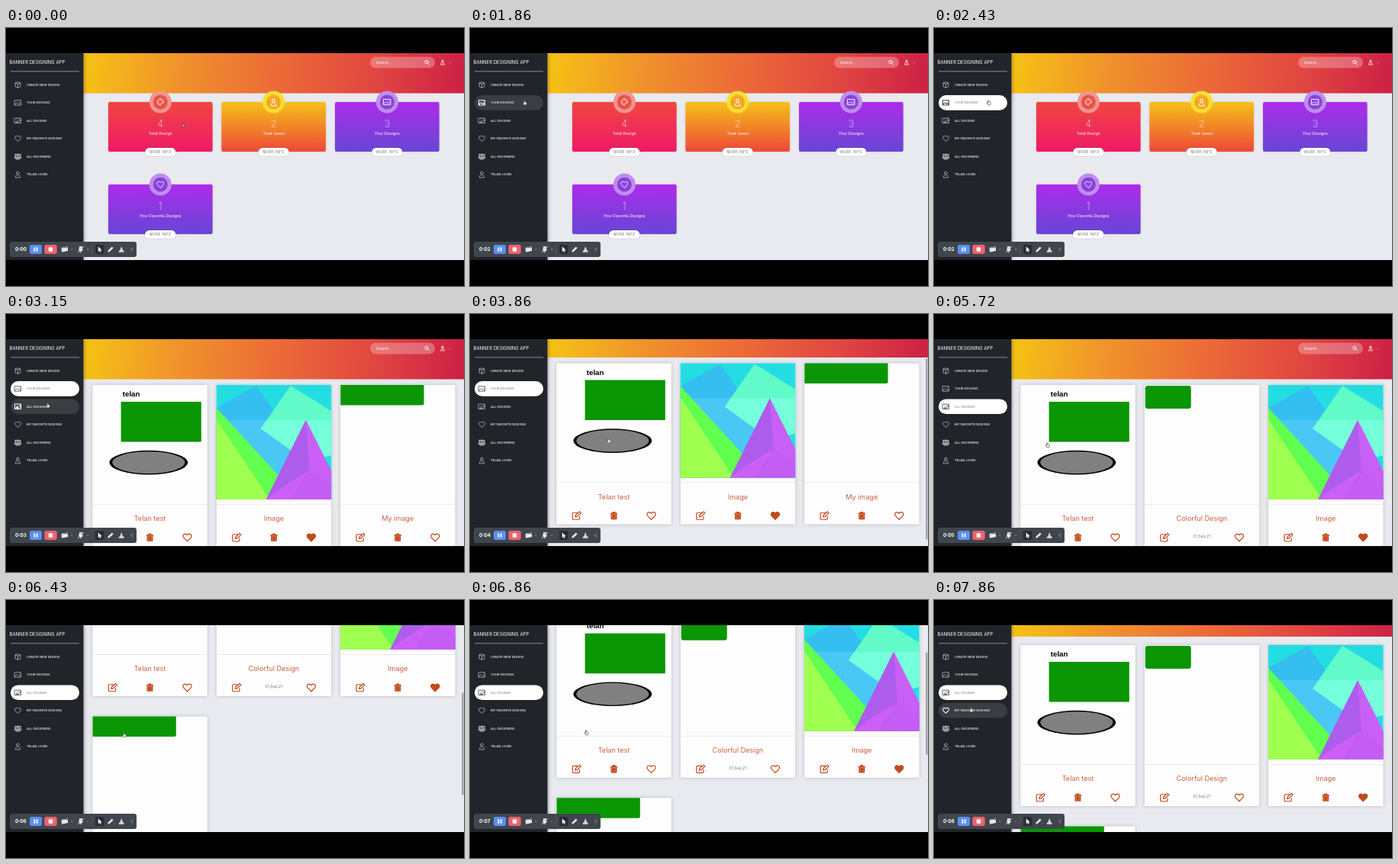
Write an HTML page with a canvas that moves like this. It is 600 px wide and 338 px high and loops after 8 s.

```html
<!DOCTYPE html>
<html lang="en">
<head>
<meta charset="utf-8">
<title>Banner Designing App</title>
<style>
html, body { margin: 0; width: 100%; height: 100%; overflow: hidden; background: #000; }
canvas { display: block; width: 600px; height: 338px; }
</style>
</head>
<body>
<canvas id="stage" width="600" height="338"></canvas>
<script>
const ctx = document.getElementById('stage').getContext('2d');
const LOOP = 8000, STEPS_PER_SEC = 7;
const TOP = 33, BOTTOM = 304, SIDE = 101.5, VIEW = BOTTOM - TOP;
const SANS = 'Inter, "Open Sans", sans-serif';
const RUST = '#c14a1c', GREEN = '#0a9605';

const MENU = [
  ['CREATE NEW DESIGN', 'box'], ['YOUR DESIGNS', 'image'], ['ALL DESIGNS', 'gallery'],
  ['MY FAVORITE DESIGNS', 'heart'], ['ALL DESIGNERS', 'group'], ['TELAN LOGIN', 'user']
];
const rowY = i => 74.5 + i * 23.4;

// Icons live in a 10 x 10 box centred on the origin.
const ICONS = {
  box: 'M0-4.5L4.2-3V3L0 4.7L-4.2 3V-3ZM-4.2-3L0-1.4L4.2-3M0-1.4V4.7',
  image: 'M-5-4H5V4H-5ZM-5 3L-1.5-.5L1 2L2.6.6L5 3M2.6-1.8h.1',
  gallery: 'M-5-4H5V4H-5ZM-3 2.3C-3-.2 1-.2 1 2.3ZM-1-1.8h.1M2.3-1.5H4M2.3.5H4',
  heart: 'M0 4.6L-4.2.4C-6.8-2.6-2.8-6.2 0-2.8C2.8-6.2 6.8-2.6 4.2.4Z',
  user: 'M-2.2-2.2A2.2 2.2 0 1 1 2.2-2.2A2.2 2.2 0 1 1-2.2-2.2M-4 5C-4-.8 4-.8 4 5Z',
  group: 'M-1.8-2.4A1.8 1.8 0 1 1 1.8-2.4A1.8 1.8 0 1 1-1.8-2.4M-5-2.3A1.3 1.3 0 1 1-2.4-2.3A1.3 1.3 0 1 1-5-2.3M2.4-2.3A1.3 1.3 0 1 1 5-2.3A1.3 1.3 0 1 1 2.4-2.3M-3 4.5C-3-1 3-1 3 4.5ZM-5.5 2.8C-5.5-2-1.5-1-2.6 2.8ZM5.5 2.8C5.5-2 1.5-1 2.6 2.8Z',
  palette: 'M0-4.6A4.6 4.6 0 1 0 .5 4.6C1.6 4 0 2.4 1.4 1.5C2.8.8 4.6 2 4.6 0A4.6 4.6 0 0 0 0-4.6M-2.4-1h.1M0-2.6h.1M2.4-1.2h.1M-2.2 1.6h.1',
  edit: 'M1-3.6H-3.6Q-4.8-3.6-4.8-2.4V3.4Q-4.8 4.6-3.6 4.6H2.4Q3.6 4.6 3.6 3.4V1M-1.6 1.6L-1-.8L3.6-4.8L5.3-3.2L.8 1Z',
  trash: 'M-4.2-3H4.2M-1.5-3V-4.6H1.5V-3M-3.3-3V4.4H3.3V-3M-1.3-1V2.8M0-1V2.8M1.3-1V2.8',
  search: 'M2.2-.8A3 3 0 1 1-3.8-.8A3 3 0 1 1 2.2-.8M1.4 1.4L4.2 4.2',
  camera: 'M-4.5-2.5H2V3H-4.5ZM2 0L4.8-2V2.6L2 .8M-4.5 5L4.5-5',
  mic: 'M-1.5-4.5H1.5V.6H-1.5ZM-3.2 0C-3 4 3 4 3.2 0M0 3V5M-4.5 5L4.5-5',
  pointer: 'M-2.6-4.6L3.8 1.4L.8 1.6L2.4 4.6L.9 5.2L-.5 2.2L-2.6 4Z',
  pencil: 'M-4.8 4.8L-4 1.8L2.6-4.8L4.8-2.6L-1.8 4Z',
  marker: 'M-4.5 5V3L-1.6 1V-1L0-5L1.6-1V1L4.5 3V5Z',
  hand: 'M-1.2-5Q-.2-5.8.5-4.8V-1.8L4-.9Q5-.4 4.7 1L3.8 5H-1.2L-3.9 1Q-3.8-.4-2.6 0L-1.2 1.2Z',
  chevron: 'M1.5-3L-1.5 0L1.5 3'
};
for (const name in ICONS) ICONS[name] = new Path2D(ICONS[name]);

function icon(name, x, y, size, color, fill, width = 1) {
  ctx.save();
  ctx.translate(x, y);
  ctx.scale(size / 10, size / 10);
  ctx.lineJoin = ctx.lineCap = 'round';
  if (fill) {
    ctx.fillStyle = fill;
    ctx.fill(ICONS[name]);
  }
  ctx.strokeStyle = color;
  ctx.lineWidth = width;
  ctx.stroke(ICONS[name]);
  ctx.restore();
}

function text(str, x, y, size, color, { align = 'left', weight = 400, gap = 0, font = SANS } = {}) {
  ctx.font = `${weight} ${size}px ${font}`;
  ctx.textAlign = align;
  ctx.textBaseline = 'alphabetic';
  ctx.letterSpacing = gap + 'px';
  ctx.fillStyle = color;
  ctx.fillText(str, x, y);
}

function rect(x, y, w, h, color, r = 0) {
  ctx.fillStyle = color;
  ctx.beginPath();
  ctx.roundRect(x, y, w, h, r);
  ctx.fill();
}

function disc(x, y, rx, color, ry = rx) {
  ctx.fillStyle = color;
  ctx.beginPath();
  ctx.ellipse(x, y, rx, ry, 0, 0, 7);
  ctx.fill();
}

function poly(color, ...pts) {
  ctx.fillStyle = color;
  ctx.beginPath();
  for (let i = 0; i < pts.length; i += 2) ctx.lineTo(pts[i], pts[i + 1]);
  ctx.fill();
}

function blend(x0, y0, x1, y1, ...colors) {
  const g = ctx.createLinearGradient(x0, y0, x1, y1);
  colors.forEach((c, i) => g.addColorStop(i / (colors.length - 1), c));
  return g;
}

function shadow(color, blur, draw) {
  ctx.save();
  ctx.shadowColor = color;
  ctx.shadowBlur = blur;
  draw();
  ctx.restore();
}

// Linear track of [step, ...values].
function track(keys, k) {
  let i = 0;
  while (i < keys.length - 2 && keys[i + 1][0] <= k) i++;
  const [k0, ...a] = keys[i], [k1, ...b] = keys[i + 1];
  const u = Math.min(1, Math.max(0, (k - k0) / (k1 - k0)));
  return a.map((v, j) => v + (b[j] - v) * u);
}

const CURSOR = [
  [0, 232, 127], [4, 405, 150], [5, 405, 150], [10, 70, 97], [17, 70, 97], [20, 66, 103],
  [22, 53, 119], [24, 180, 165], [29, 180, 165], [34, 74, 131], [35, 63, 127], [37, 63, 127],
  [40, 147, 171], [45, 153, 176], [49, 150, 172], [52, 112, 160], [55, 47, 143]
];
const SCROLL = {
  yours: [[24, 0], [28, 38]],
  all: [[40, 0], [43, 275], [44, 275], [45, 178], [47, 90], [50, 34]]
};

function header(bottom, scroll) {
  if (bottom > TOP) {
    rect(SIDE, TOP, 600 - SIDE, bottom - TOP,
      blend(SIDE, 30, 600, 80, '#f6c315', '#f0932b', '#ec6c37', '#e24841', '#cc2046'));
  }
  const y = 45 - scroll;
  rect(477, y - 7.2, 85, 14.6, 'rgba(255,255,255,.27)', 7.3);
  text('Search...', 484.5, y + 1.8, 5, '#fff');
  icon('search', 551.5, y, 7, '#fff', null, 1.3);
  icon('user', 572, y - .3, 6, '#fff', null, 1.3);
  disc(581.5, y, .7, 'rgba(255,255,255,.7)');
}

const STATS = [
  [134, 97, '4', 'Total Design', 'palette', '#f04640', '#ef1967', '#ee5146', '#ef9691'],
  [282.3, 97, '2', 'Total Users', 'user', '#f6c118', '#ee4838', '#f0a91f', '#f6dd35'],
  [431, 97, '3', 'Your Designs', 'image', '#ac2cea', '#6746d5', '#8644da', '#c08ceb'],
  [134, 205, '1', 'Your Favorite Designs', 'heart', '#ac2cea', '#6746d5', '#8644da', '#c08ceb']
];

function dashboard() {
  for (const [x, y, count, label, glyph, top, low, core, ring] of STATS) {
    const cx = x + 68.3, center = { align: 'center' };
    shadow('rgba(0,0,0,.15)', 3, () => rect(x, y, 136.6, 65, blend(0, y, 0, y + 65, top, low), 2));
    disc(cx, y, 14.6, ring);
    disc(cx, y, 9.5, core);
    icon(glyph, cx, y, 9, '#fff');
    text(count, cx, y + 33, 13, 'rgba(255,255,255,.85)', { align: 'center', weight: 200 });
    text(label, cx, y + 43.3, 5.3, '#fff', center);
    shadow('rgba(0,0,0,.2)', 2, () => rect(cx - 20, y + 60, 40, 10.8, '#fff', 5.4));
    text('MORE INFO', cx + .2, y + 67, 4.3, '#666', { align: 'center', gap: .5 });
  }
}

// Artwork in a 150 x 150 area.
const ART = {
  shapes() {
    text('telan', 39.5, 15.3, 9.7, '#000', { weight: 700, font: '"Liberation Sans", Arial, sans-serif' });
    rect(37.3, 22, 105.2, 52.5, GREEN);
    disc(73.5, 101.6, 51.3, '#000', 15.8);
    disc(73.5, 101.6, 47.6, '#808080', 14.4);
  },
  block() { rect(1, 1, 60, 30, GREEN, 3); },
  strip() { rect(.3, 0, 109.2, 26.5, GREEN, [0, 0, 2, 0]); },
  colors() {
    rect(0, 0, 150.5, 150, '#24dde3');
    poly('#34bff0', 0, 30, 52, 1, 112, 85, 150, 150, 0, 150);
    poly('#49c8f6', 8, 46, 84, 46, 140, 150, 30, 150);
    poly('#60fbc8', 97, 1, 150.5, 34, 150.5, 92, 118, 100, 58, 57);
    poly('#76ffdb', 66, 46, 150.5, 46, 150.5, 92, 118, 100, 58, 57);
    poly('#62ff50', 0, 30, 110, 150, 0, 150);
    poly('#9fff50', 0, 45, 70, 150, 0, 150);
    poly('#ae5cec', 117, 46, 150.5, 113, 150.5, 150, 65, 150);
    poly('#c960f6', 117, 46, 150.5, 113, 150.5, 134, 122, 112);
    poly('#cb5ff7', 65, 150, 86, 134, 122, 112, 98, 150);
    poly('#c45df4', 98, 150, 122, 112, 150.5, 134, 150.5, 150);
  }
};

const COLS = [113.3, 275.7, 438];
const PAGES = {
  yours: [[0, 'Telan test', 'shapes'], [1, 'Image', 'colors', true], [2, 'My image', 'strip']],
  all: [[0, 'Telan test', 'shapes'], [1, 'Colorful Design', 'block', false, '01,Sep,21'],
    [2, 'Image', 'colors', true], [3, 'My image', 'strip']]
};

function designs(page, scroll) {
  for (const [slot, title, art, liked, date] of PAGES[page]) {
    ctx.save();
    ctx.translate(COLS[slot % 3], 93 + Math.floor(slot / 3) * 237.6 - scroll);
    shadow('rgba(0,0,0,.22)', 4, () => rect(0, 0, 150.5, 211, '#fefdfe', 1.5));
    ART[art]();
    rect(0, 156, 150.5, .8, '#e4e4e6');
    text(title, 75.2, 178.2, 9.1, '#cb6240', { align: 'center' });
    icon('edit', 26.3, 199.7, 11, RUST, null, 1.1);
    if (date) text(date, 75.2, 200.3, 5.1, '#777', { align: 'center' });
    else icon('trash', 75.2, 199.7, 10, RUST, '#dd8a5c', 1.3);
    icon('heart', 124.2, 199.7, 11, RUST, liked && RUST, 1.1);
    ctx.restore();
  }
}

function scrollbar(scroll, max) {
  const total = VIEW + max;
  rect(597, TOP + scroll / total * VIEW, 2.6, VIEW * VIEW / total, '#a4a4a9', 1.3);
}

function sidebar(active, cx, cy) {
  shadow('rgba(0,0,0,.4)', 5, () => rect(0, TOP, SIDE, VIEW, '#212529'));
  text('BANNER DESIGNING APP', 4.5, 47.1, 6, '#fff');
  rect(6, 56.4, 90, .9, '#a9abad');
  MENU.forEach(([label, glyph], i) => {
    const y = rowY(i), on = i === active;
    const hover = cx < 96 && Math.abs(cy - y) < 9.8;
    if (on || hover) rect(6, y - 9.8, 90, 19.6, on ? '#fff' : '#3a3d42', 9.8);
    icon(glyph, 15.5, y, 8, on ? '#444' : hover ? '#fff' : '#b5b7b9', glyph === 'group' ? '#9a9c9e' : null, hover ? 1.3 : 1);
    text(label, 27, y + 1.5, 4.1, on ? '#777' : '#f2f2f2', { weight: on ? 400 : 500 });
  });
}

function recorder(sec) {
  const y = 290;
  rect(5, 280, 166, 20, '#41454e', 3);
  text('0:0' + sec, 12, y + 2.3, 6.4, '#fff', { weight: 700 });
  rect(31, 284, 16, 12, '#5a8ff0', 2.5);
  rect(36.4, 287.3, 1.8, 5.4, '#fff');
  rect(39.7, 287.3, 1.8, 5.4, '#fff');
  rect(50.3, 284, 16.4, 12, '#ee626e', 2.5);
  rect(55.8, 287.3, 5.4, 5.4, '#fff', .7);
  icon('camera', 77, y, 7.5, '#fff', '#ddd', 1.3);
  disc(86.3, y, .8, '#aaa');
  icon('mic', 98, y, 7.5, '#fff', '#bbb', 1.3);
  disc(107.2, y, .8, '#aaa');
  rect(112, 284, .6, 12, '#5c606a');
  rect(117, 284, 11.5, 12, '#292c33', 2);
  icon('pointer', 122.8, y, 7, '#fff', '#fff', .4);
  icon('pencil', 137, y, 7, '#fff', '#fff', .4);
  icon('marker', 151.2, y, 7, '#fff', '#ddd', .4);
  icon('chevron', 164.7, y, 6, '#bbb', null, 1.3);
}

function draw(t) {
  const k = Math.floor(t * STEPS_PER_SEC / 1000 + 1e-6);
  const [cx, cy] = track(CURSOR, k);
  const page = k < 18 ? 'home' : k < 38 ? 'yours' : 'all';
  const active = k < 17 ? -1 : k < 37 ? 1 : 2;
  const scroll = page === 'home' ? 0 : track(SCROLL[page], k)[0];

  ctx.fillStyle = '#000';
  ctx.fillRect(0, 0, 600, 338);
  ctx.save();
  ctx.beginPath();
  ctx.rect(0, TOP, 600, VIEW);
  ctx.clip();
  rect(0, TOP, 600, VIEW, '#e9eaef');
  header(page === 'all' && k >= 50 ? 48 : 85.5 - scroll, scroll);
  if (page === 'home') dashboard();
  else designs(page, scroll);
  if (k >= 25 && k < 31) scrollbar(scroll, 38);
  if (k >= 41 && k < 53) scrollbar(scroll, 275);
  sidebar(active, cx, cy);
  recorder(Math.floor((t + 143) / 1000));
  if (k < 5) icon('pointer', cx + .7, cy + .8, 4.5, '#333', '#fff', 1.2);
  else icon('hand', cx + 1.5, cy + .7, 6, '#333', '#fff', 1);
  ctx.restore();
}

const start = performance.now();
function tick() {
  draw((performance.now() - start) % LOOP);
  requestAnimationFrame(tick);
}
tick();
</script>
</body>
</html>
```
